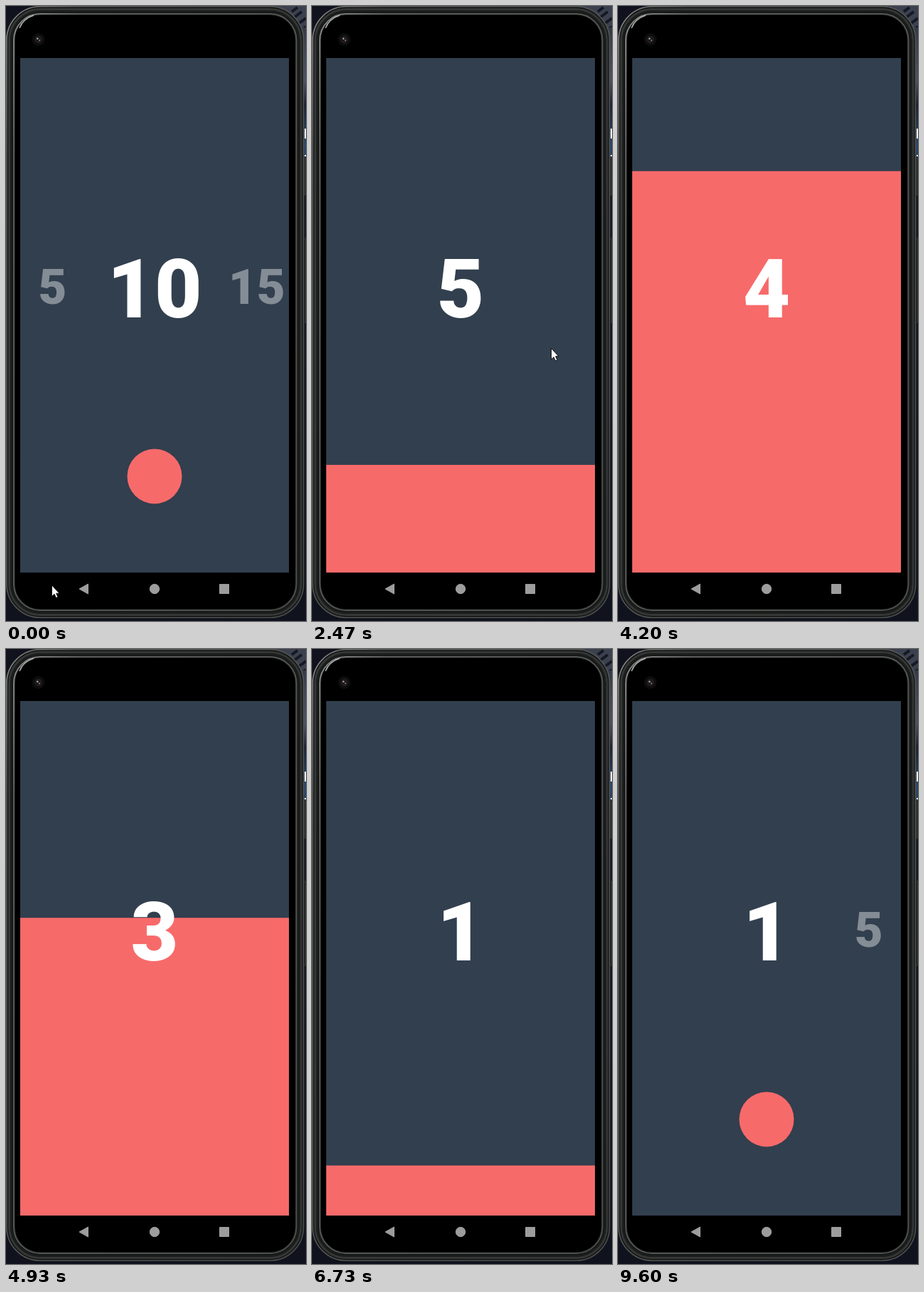
An HTML page that plays this animation: 422x863 px, repeating every 9990 ms.

```html
<!DOCTYPE html>
<html lang="en">
<head>
<meta charset="utf-8">
<title>Countdown timer</title>
<style>
  html, body { margin: 0; width: 100%; height: 100%; overflow: hidden; background: #10131e; }
  svg { display: block; width: 422px; height: 863px; }
  text { font: 900 114.9px Roboto, sans-serif; fill: #fff; text-anchor: middle; }
</style>
</head>
<body>
<svg viewBox="0 0 422 863">
  <defs>
    <clipPath id="screen"><rect x="20" y="73" width="378" height="722"/></clipPath>
    <linearGradient id="strip" x1="0" y1="0" x2="0" y2="1">
      <stop offset="0" stop-color="#343a48"/>
      <stop offset=".09" stop-color="#4a5160"/>
      <stop offset=".13" stop-color="#1a2030"/>
      <stop offset=".2" stop-color="#29486a"/>
      <stop offset=".24" stop-color="#1d3450"/>
      <stop offset=".26" stop-color="#151822"/>
      <stop offset="1" stop-color="#10131e"/>
    </linearGradient>
    <linearGradient id="rim" x1="0" y1="0" x2="1" y2="1">
      <stop offset="0" stop-color="#8a8c8a"/>
      <stop offset=".12" stop-color="#5a5c5a"/>
      <stop offset="1" stop-color="#4c4e4c"/>
    </linearGradient>
  </defs>

  <!-- desktop behind the phone -->
  <rect width="422" height="863" fill="#10131e"/>
  <path d="M372 0H422V60Q412 12 372 0Z" fill="#3b414f"/>
  <path d="M402 8l8 -6M404 17l12 -9M411 25l11 -8M418 32l4 -3" stroke="#151923" stroke-width="4"/>
  <rect x="417" y="30" width="5" height="833" fill="url(#strip)"/>
  <path d="M420 172h2v14h-2zM420 209h2v2h-2z" fill="#fff"/>
  <path d="M418 212h4v54h-4z" fill="#2d2e2e"/>
  <path d="M418 326h3.500v118h-3.500z" fill="#1b1c1c" stroke="#444" stroke-width=".7"/>

  <!-- phone body -->
  <g fill="none">
    <rect x="1" y=".8" width="417.500" height="857.400" rx="47" fill="#111312" stroke="url(#rim)" stroke-width="1.600"/>
    <rect x="4.500" y="4.500" width="410.500" height="850" rx="44" stroke="#343635" stroke-width="3"/>
    <rect x="7.500" y="7.500" width="404.500" height="844" rx="41" stroke="#1b1d1c" stroke-width="3"/>
    <rect x="11" y="11" width="397.500" height="837" rx="37" stroke="url(#rim)" stroke-width="2"/>
    <rect x="13" y="13" width="393.500" height="833" rx="35" fill="#000"/>
    <path d="M19 31Q24 18 39 13" stroke="#b0b2b0" stroke-width="1.500"/>
  </g>
  <circle cx="45.500" cy="47" r="9" fill="#0d0d0e"/>
  <circle cx="45.500" cy="47" r="4.500" fill="#1c1819" stroke="#282828"/>
  <circle cx="44.300" cy="45.700" r="1.200" fill="#b5aaa8"/>
  <circle cx="47" cy="48.300" r="1.100" fill="#9a7373"/>

  <!-- app -->
  <g clip-path="url(#screen)">
    <rect x="20" y="73" width="378" height="722" fill="#323f4e"/>
    <rect id="fill" x="20" y="73" width="378" height="722" fill="#f76a6a"/>
    <circle id="button" cx="209" cy="660" r="38.500" fill="#f76a6a"/>
    <g id="list"></g>
    <text id="count" x="209" y="436.500"></text>
  </g>

  <g fill="#9d9d9d" stroke="#9d9d9d" stroke-linejoin="round">
    <path d="M103 818L115.500 811V825Z"/>
    <circle cx="209" cy="818" r="6.700"/>
    <rect x="300.500" y="811.500" width="13" height="13"/>
  </g>
  <path id="cursor" d="M.5 .8V16.500L4 13.200L6.500 18.500L9 17.400L6.700 12.200H11Z" fill="#fff" stroke="#111" stroke-width="1"/>
</svg>

<script>
const LOOP = 9990, FPS = 15, LAST = 144;
const ITEM = 143.64, MID = 209, HEIGHT = 722;
const VALUES = [1, 5, 10, 15, 20];
const PRESS = 2078, RISE = 2378, COUNT = 2678, DONE = 7678, RESET = 8078;

// time, x, y of the pointer tip
const POINTER = [
  [0, 64, 812], [530, 149, 393], [730, 149, 393], [980, 255, 400], [1100, 257, 404],
  [1600, 238, 638], [1670, 237, 641], [2150, 237, 641], [2730, 411, 357], [2860, 440, 335],
  [7530, 440, 335], [7530, 110, 600], [7670, 118, 430], [7900, 125, 397], [8480, 125, 395],
  [8780, 230, 400], [8850, 232, 404], [9350, 215, 875]
];

const $ = id => document.getElementById(id);
const clamp = v => Math.min(1, Math.max(0, v));
const span = (t, from, length) => clamp((t - from) / length);
const smooth = u => u * u * (3 - 2 * u);

// cubic bezier (.42, 0, 1, 1)
function easeIn(x) {
  let lo = 0, hi = 1;
  for (let i = 0; i < 24; i++) {
    const s = (lo + hi) / 2, r = 1 - s;
    if (1.26 * r * r * s + 3 * r * s * s + s * s * s < x) lo = s; else hi = s;
  }
  return smooth(lo);
}
const easeInOut = u =>
  u <= 0 ? 0 : u >= 1 ? 1 : u < .5 ? easeIn(2 * u) / 2 : 1 - easeIn(2 - 2 * u) / 2;
const tween = (t, from, length) => easeInOut(span(t, from, length));

const items = VALUES.map(value => {
  const el = document.createElementNS("http://www.w3.org/2000/svg", "text");
  el.textContent = value;
  el.setAttribute("y", 45.1);
  return $("list").appendChild(el);
});

function pointerAt(t) {
  const i = POINTER.findLastIndex(k => k[0] <= t);
  const a = POINTER[i], b = POINTER[i + 1] || a;
  const u = b === a ? 0 : smooth((t - a[0]) / (b[0] - a[0]));
  return [a[1] + (b[1] - a[1]) * u, a[2] + (b[2] - a[2]) * u];
}

function draw(t) {
  const scroll = 2 - smooth(span(t, 750, 450)) - smooth(span(t, 8530, 450));
  items.forEach((el, i) => {
    const off = i - scroll, near = clamp(1 - Math.abs(off));
    el.setAttribute("transform", `translate(${MID + off * ITEM} 391.4) scale(${.6 + .4 * near})`);
    el.setAttribute("opacity", .4 + .6 * near);
  });

  const away = tween(t, PRESS, 300) - tween(t, RESET, 300);
  $("list").setAttribute("opacity", 1 - away);
  $("button").setAttribute("opacity", 1 - away);
  $("button").setAttribute("transform", `translate(0 ${192.5 * away})`);

  const spent = tween(t, COUNT, DONE - COUNT);
  const top = t < COUNT ? 1 - tween(t, RISE, 300) : spent;
  $("fill").setAttribute("transform", `translate(0 ${HEIGHT * top})`);
  $("count").textContent = t < RESET ? Math.ceil(5 * (1 - spent)) : 5;
  $("count").setAttribute("opacity", away);

  $("cursor").setAttribute("transform", `translate(${pointerAt(t).join(" ")})`);
}

const start = performance.now();
function tick() {
  const t = (performance.now() - start) % LOOP;
  const step = Math.min(LAST, Math.floor((t + 5) * FPS / 1000));
  draw(step * 1000 / FPS);
  requestAnimationFrame(tick);
}
tick();
</script>
</body>
</html>
```
